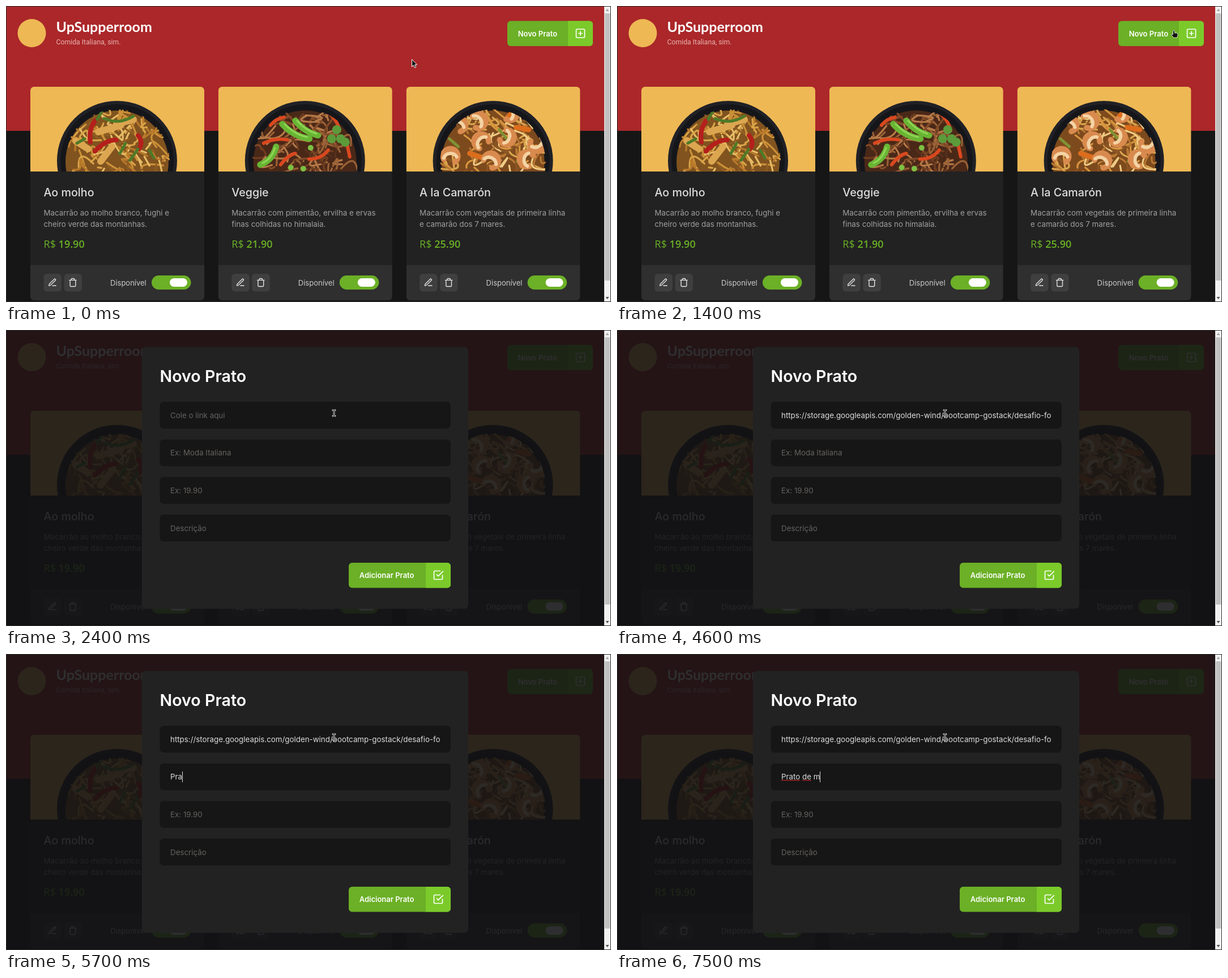
An HTML page that plays this animation: 1068 by 524 pixels, repeating every 8 s.

```html
<!DOCTYPE html>
<html lang="pt">
<head>
<meta charset="utf-8">
<style>
  html, body { margin: 0; width: 100%; height: 100%; overflow: hidden; background: #161616; }
  svg { display: block; }
  text { font: 13.35px Inter, sans-serif; fill: #fff; white-space: pre; }
  .brand { font: 700 25px Lato, sans-serif; }
  .motto { font: 12.25px Roboto, sans-serif; fill: #e8b3b0; }
  .button { font-weight: 600; font-size: 13px; }
  .dish { font-weight: 500; font-size: 19.7px; fill: #ddd; }
  .about { fill: #a0a0a0; }
  .price { font: 18px "Open Sans", sans-serif; fill: #6bb026; }
  .bold { font-weight: 600; }
  .state { font-size: 13px; fill: #ccc; }
  .heading { font-weight: 600; font-size: 28.6px; }
  .hint { fill: #666360; }
  .value { fill: #ddd; }
  .icon, .noodles path { fill: none; stroke-linecap: round; stroke-linejoin: round; }
</style>
</head>
<body>
<svg id="stage" width="1068" height="524" viewBox="0 0 1068 524"></svg>
<script>
const GREEN = '#6bb026', LIME = '#7bca2a', AMBER = '#eeb855';
const $ = id => document.getElementById(id);

const rect = (x, y, w, h, fill, r = 0) =>
  `<rect x="${x}" y="${y}" width="${w}" height="${h}" rx="${r}" fill="${fill}"/>`;
const text = (x, y, cls, str) => `<text x="${x}" y="${y}" class="${cls}">${str}</text>`;
const line = (d, color, width) => `<path d="${d}" stroke="${color}" stroke-width="${width}"/>`;
const dot = (x, y, r, fill) => `<circle cx="${x}" cy="${y}" r="${r}" fill="${fill}"/>`;

const ICONS = {
  pen: 'M12 20h9M16.5 3.5a2.1 2.1 0 0 1 3 3L7 19l-4 1 1-4z',
  bin: 'M3 6h18M19 6v14a2 2 0 0 1-2 2H7a2 2 0 0 1-2-2V6m3 0V4a2 2 0 0 1 2-2h4a2 2 0 0 1 2 2v2',
  plus: 'M5 3h14a2 2 0 0 1 2 2v14a2 2 0 0 1-2 2H5a2 2 0 0 1-2-2V5a2 2 0 0 1 2-2zM12 8v8M8 12h8',
  check: 'M9 11l3 3L22 4M21 12v7a2 2 0 0 1-2 2H5a2 2 0 0 1-2-2V5a2 2 0 0 1 2-2h11'
};
const icon = (name, cx, cy, size, color) =>
  `<path class="icon" d="${ICONS[name]}" stroke="${color}" stroke-width="2"
    transform="translate(${cx - size / 2} ${cy - size / 2}) scale(${size / 24})"/>`;

// Green button with a lighter icon part at its right end
const button = (x, y, w, label, name) =>
  rect(x, y, w, 44.5, GREEN, 6) +
  `<path d="M${x + w - 44} ${y}h38a6 6 0 0 1 6 6v32.5a6 6 0 0 1-6 6h-38z" fill="${LIME}"/>` +
  text(x + 18.7, y + 27, 'button', label) + icon(name, x + w - 22, y + 22, 20, '#fff');

let seed = 7;
const rnd = (a, b) => {
  seed = (seed * 16807) % 2147483647;
  return a + (b - a) * seed / 2147483647;
};

function noodles(colors) {
  let out = '';
  for (let i = 0; i < 110; i++) {
    const a = rnd(0, 6.28), r = 88 * Math.sqrt(rnd(0, 1));
    const x = 153 + r * Math.cos(a), y = 131 + r * Math.sin(a);
    const n = () => rnd(-32, 32).toFixed(1);
    out += line(`M${x.toFixed(1)} ${y.toFixed(1)}q${n()} ${n()} ${n()} ${n()}`,
      colors[i % colors.length], 3.2);
  }
  return out;
}

const strokes = (color, width, ...paths) => paths.map(d => line(d, color, width)).join('');
const shrimp = (x, y, turn) => `<g transform="translate(${x} ${y}) rotate(${turn})">` +
  line('M-12 6a13 13 0 1 1 20 5', '#d98a4e', 10) +
  line('M-12 4a13 13 0 0 1 23 -2', '#f4d3a4', 6) + '</g>';

const DISHES = [
  {
    name: 'Ao molho', price: '19.90',
    about: ['Macarrão ao molho branco, fughi e', 'cheiro verde das montanhas.'],
    base: '#80531f', colors: ['#d9a348', '#b97a2b', '#e6bb66', '#8f5c22', '#cc9138'],
    extras: () =>
      strokes('#b51f1b', 8, 'M114 60q-12 18 -8 38', 'M114 114q18 -20 38 -20', 'M190 86q10 12 2 24') +
      strokes('#dca650', 12, 'M120 80l40 -12', 'M152 66l30 -8', 'M124 132l20 -26', 'M80 96l22 14') +
      strokes('#4d7a27', 5, 'M118 58l8 -14', 'M130 56q26 12 52 -4', 'M158 118l10 -18',
        'M96 92l-14 8', 'M176 130l14 -20', 'M210 112l8 14')
  },
  {
    name: 'Veggie', price: '21.90',
    about: ['Macarrão com pimentão, ervilha e ervas', 'finas colhidas no himalaia.'],
    base: '#4a2818', colors: ['#9a6136', '#6f3e20', '#b67a48', '#58301c', '#824b28'],
    extras: () =>
      strokes('#d9481f', 6, 'M80 100q20 -10 42 -6', 'M190 44q20 12 24 34', 'M92 68q10 -12 24 -14',
        'M160 128q22 0 34 -16', 'M226 96l6 28', 'M110 138q14 -18 26 -20') +
      strokes('#69b534', 11, 'M113 66q20 22 48 26', 'M136 60q16 20 40 26', 'M102 106q-6 24 -28 32') +
      strokes('#8fd655', 3, 'M117 66q20 20 40 23', 'M139 60q16 18 34 23', 'M100 108q-6 20 -22 27') +
      [[200, 92], [216, 92], [209, 76], [224, 98]].map(p => dot(...p, 8, '#5c9a3a')).join('') +
      [[150, 145], [163, 108], [128, 143]].map(p => dot(...p, 5, '#7cc043')).join('')
  },
  {
    name: 'A la Camarón', price: '25.90',
    about: ['Macarrão com vegetais de primeira linha', 'e camarão dos 7 mares.'],
    base: '#7d4a1d', colors: ['#dba64f', '#b87833', '#efcb83', '#8b5423', '#d7963f'],
    extras: () =>
      strokes('#dc6d1d', 9, 'M194 72l22 4', 'M112 118l24 8', 'M176 58l10 -12') +
      strokes('#7f9235', 5, 'M76 92l16 14', 'M164 76l18 22', 'M196 132l20 -20', 'M104 48l14 -10') +
      [[92, 66, 20], [128, 60, 60], [132, 96, -50], [78, 122, 0], [178, 90, 110],
        [150, 130, 30], [212, 128, -80], [184, 46, 70], [232, 102, 150]]
        .map(p => shrimp(...p)).join('')
  }
];

const card = (d, i) => `<g transform="translate(${43 + i * 331.8} 143)">
  <g clip-path="url(#round)">
    ${rect(0, 0, 307, 150, AMBER)}
    <g clip-path="url(#photo)" class="noodles">
      ${dot(153, 131, 106, '#202126')}${dot(153, 131, 100, '#15161a')}${dot(153, 133, 91, d.base)}
      <g clip-path="url(#food)">${noodles(d.colors)}${d.extras()}</g>
    </g>
    ${rect(0, 150, 307, 166, '#222')}${rect(0, 315.5, 307, 63, '#2f2f2f')}
  </g>
  ${text(23.5, 194, 'dish', d.name)}
  ${d.about.map((s, k) => text(23.5, 228 + k * 19.7, 'about', s)).join('')}
  ${text(23.5, 285, 'price', `R$ <tspan class="bold">${d.price}</tspan>`)}
  ${rect(23.5, 331, 31.5, 31.5, '#3f3f3f', 6)}${icon('pen', 39, 346.5, 16.7, '#e6e6e6')}
  ${rect(59.5, 331, 31.5, 31.5, '#3f3f3f', 6)}${icon('bin', 75, 346.5, 16.7, '#e6e6e6')}
  ${text(141, 351.5, 'state', 'Disponível')}
  ${rect(214, 334, 69.5, 25, GREEN, 12.5)}${rect(246, 339, 31, 15, '#fff', 7.5)}
</g>`;

const ROWS = [127, 193.7, 260.3, 326.8];
const HINTS = ['Cole o link aqui', 'Ex: Moda Italiana', 'Ex: 19.90', 'Descrição'];
const LINK = 'https://storage.googleapis.com/golden-wind/bootcamp-gostack/desafio-food';

$('stage').innerHTML = `
  <defs>
    <clipPath id="round"><rect width="307" height="378" rx="6.5"/></clipPath>
    <clipPath id="photo"><rect width="307" height="150"/></clipPath>
    <clipPath id="food"><circle cx="153" cy="133" r="93"/></clipPath>
    <clipPath id="field"><rect x="290" y="130" width="476" height="240"/></clipPath>
  </defs>
  ${rect(0, 0, 1068, 524, '#161616')}${rect(0, 0, 1056, 221, '#ab2729')}
  ${dot(45.5, 48, 25, AMBER)}
  ${text(88.5, 46, 'brand', 'UpSupperroom')}${text(88.5, 68, 'motto', 'Comida Italiana, sim.')}
  ${button(885, 26.5, 151, 'Novo Prato', 'plus')}
  ${DISHES.map(card).join('')}
  <g id="modal">
    ${rect(0, 0, 1056, 524, 'rgba(18,18,20,.88)')}
    ${rect(240, 30, 576, 463.5, '#222', 7)}
    ${text(271.5, 92, 'heading', 'Novo Prato')}
    ${ROWS.map(y => rect(271.5, y, 513.5, 47.5, '#161616', 7)).join('')}
    <g clip-path="url(#field)">
      ${HINTS.map((_, i) => `<text id="row${i}" x="290" y="${ROWS[i] + 28.7}"></text>`).join('')}
    </g>
    <g id="marks"></g>
    ${button(605, 412, 180, 'Adicionar Prato', 'check')}
  </g>
  ${rect(1056, 0, 12, 524, '#f1f1f1')}${rect(1057, 13, 9.5, 473, '#c1c1c1')}
  <path d="M1058.5 9l3-4 3 4z" fill="#a3a3a3"/><path d="M1058.5 515l3 4 3-4z" fill="#505050"/>
  <rect x=".5" y=".5" width="1067" height="523" fill="none" stroke="#2c2c2c"/>
  <path id="cursor" stroke-linejoin="round"/>`;

const SHAPES = {
  arrow: { d: 'M.5.5v13l3-2.8 2 4.6 2.2-1-2-4.4h4z', fill: '#111', stroke: '#fff', width: 1 },
  hand: {
    d: 'M-1.5 1.5q1.5-2 3 0v3.5q3-1 5.5 1v3l-1.5 4h-6l-4-5q0-2 3-.5z',
    fill: '#111', stroke: '#fff', width: .8
  },
  beam: {
    d: 'M-3-6h2.2l.8.8.8-.8H3v1.6H1v8.8h2V6H.8L0 5.2-.8 6H-3V4.4h2v-8.8h-2z',
    fill: '#111', stroke: '#ddd', width: .9
  }
};
// start time, x, y, shape
const MOVES = [
  [0, 716, 94, 'arrow'], [300, 738, 92, 'arrow'], [400, 800, 88, 'arrow'], [500, 880, 82, 'arrow'],
  [600, 946, 74, 'arrow'], [700, 978, 66, 'hand'], [900, 981, 52, 'hand'], [1000, 984, 42, 'hand'],
  [1200, 983, 43, 'hand'], [1500, 980, 43, 'arrow'], [1800, 892, 98, 'arrow'],
  [1900, 782, 168, 'beam'], [2200, 738, 162, 'beam'], [2300, 640, 152, 'beam'], [2400, 579, 147, 'beam']
];
const TYPED = [[0, ''], [5200, 'P'], [5600, 'Pr'], [5700, 'Pra'], [7300, 'Prato de '], [7500, 'Prato de m']];
const latest = (list, t) => list.filter(e => e[0] <= t).pop();

function setRow(i, value) {
  const row = $('row' + i);
  row.textContent = value || HINTS[i];
  row.setAttribute('class', value ? 'value' : 'hint');
}

function draw(t) {
  const [, x, y, kind] = latest(MOVES, t), shape = SHAPES[kind], cursor = $('cursor');
  cursor.setAttribute('d', shape.d);
  cursor.setAttribute('fill', shape.fill);
  cursor.setAttribute('stroke', shape.stroke);
  cursor.setAttribute('stroke-width', shape.width);
  cursor.setAttribute('transform', `translate(${x} ${y})`);

  $('modal').style.display = t < 1500 ? 'none' : '';
  if (t < 1500) return;

  const typed = latest(TYPED, t)[1], row = $('row1');
  setRow(0, t < 4600 ? '' : LINK);
  setRow(1, typed);
  const span = (from, n) => n ? row.getSubStringLength(from, n) : 0;
  let marks = t < 5000 ? '' : rect(290 + Math.round(span(0, typed.length)), 208, 1, 19, '#ddd');
  if (typed.length > 8)
    marks += rect(290, 223, span(0, 5), 1.2, '#c02626') +
      rect(290 + span(0, 6), 223, span(6, 2), 1.2, '#c02626');
  $('marks').innerHTML = marks;
}

HINTS.forEach((_, i) => setRow(i, ''));
const start = performance.now();
function tick(now) {
  draw(Math.max(0, now - start) % 8000);
  requestAnimationFrame(tick);
}
tick(start);
</script>
</body>
</html>
```
